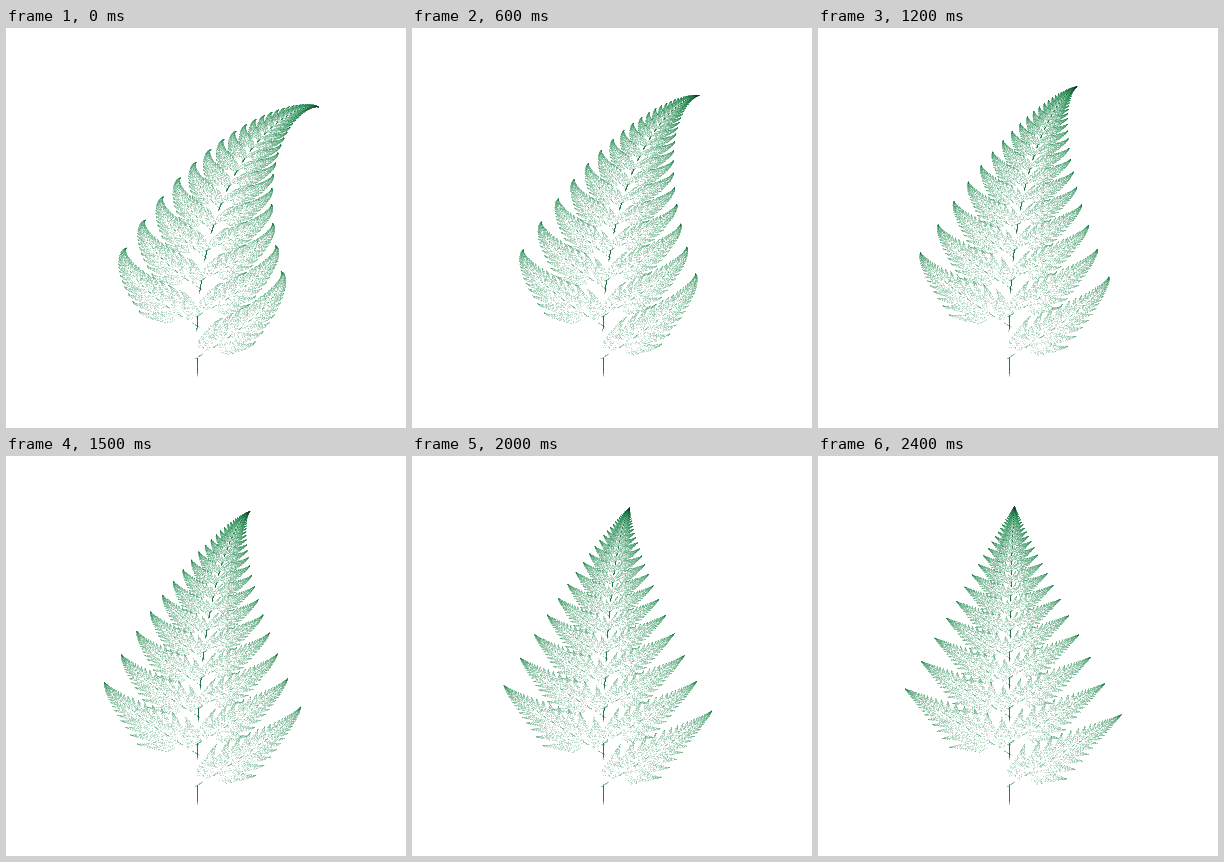
An HTML page with a canvas that plays this animation: 400 px wide and 400 px high, repeating every 2.5 s.

```html
<!DOCTYPE html>
<html lang="en">
<head>
<meta charset="utf-8">
<title>Swaying fern</title>
<style>
  html, body { margin: 0; width: 100%; height: 100%; overflow: hidden; background: #fff; }
  canvas { display: block; width: 400px; height: 400px; }
</style>
</head>
<body>
<canvas id="stage" width="400" height="400"></canvas>
<script>
const SIZE = 400, STEPS = 25, STEP_MS = 100, POINTS = 50000;
const ORIGIN = { x: 191.2, y: 341.5 }, SCALE = { x: 37.9, y: 27.3 };
const WHITE = [255, 255, 255], GREEN = [46, 145, 90], DARK = [30, 48, 42];
const FULL_HITS = 75, GREEN_AT = 0.72;

const ctx = document.getElementById('stage').getContext('2d');
const image = ctx.createImageData(SIZE, SIZE);
const hits = new Uint16Array(SIZE * SIZE);

function seededRandom(seed) {
  return () => {
    seed = (seed + 0x6D2B79F5) | 0;
    let t = Math.imul(seed ^ (seed >>> 15), 1 | seed);
    t = (t + Math.imul(t ^ (t >>> 7), 61 | t)) ^ t;
    return ((t ^ (t >>> 14)) >>> 0) / 4294967296;
  };
}

// Each row: a, b, c, d, vertical shift, cumulative probability.
function fernMaps(bend) {
  return [
    [0, 0, 0, 0.07, -0.28, 0.01],
    [0.85, bend, -bend, 0.85, 1.6, 0.86],
    [0.2, -0.26, 0.23, 0.22, 1.6, 0.93],
    [-0.15, 0.28, 0.26, 0.24, 0.44, 1]
  ];
}

const mix = (from, to, t) => from.map((v, i) => v + (to[i] - v) * t);

// Logarithmic density: white through green to nearly black.
function shade(count) {
  const t = Math.min(1, Math.log(1 + count) / Math.log(1 + FULL_HITS));
  return t < GREEN_AT
    ? mix(WHITE, GREEN, t / GREEN_AT)
    : mix(GREEN, DARK, (t - GREEN_AT) / (1 - GREEN_AT));
}
const ramp = Array.from({ length: FULL_HITS + 1 }, (_, n) => shade(n));

function scatter(bend) {
  const maps = fernMaps(bend);
  const random = seededRandom(17);
  let x = 0, y = 0;
  hits.fill(0);
  for (let n = 0; n < POINTS; n++) {
    const r = random();
    const [a, b, c, d, shift] = maps.find(m => r < m[5]);
    [x, y] = [a * x + b * y, c * x + d * y + shift];
    const px = Math.floor(ORIGIN.x + SCALE.x * x);
    const py = Math.floor(ORIGIN.y - SCALE.y * y);
    hits[py * SIZE + px]++;
  }
}

function drawFern(step) {
  scatter(0.05 * (1 - step / STEPS));
  image.data.fill(255);
  hits.forEach((count, i) => {
    if (count) image.data.set(ramp[Math.min(count, FULL_HITS)], i * 4);
  });
  ctx.putImageData(image, 0, 0);
}

let shown = -1;
const start = performance.now();

function tick() {
  const elapsed = performance.now() - start;
  const step = Math.floor(elapsed / STEP_MS) % STEPS;
  if (step !== shown) drawFern(shown = step);
  requestAnimationFrame(tick);
}
tick();
</script>
</body>
</html>
```
